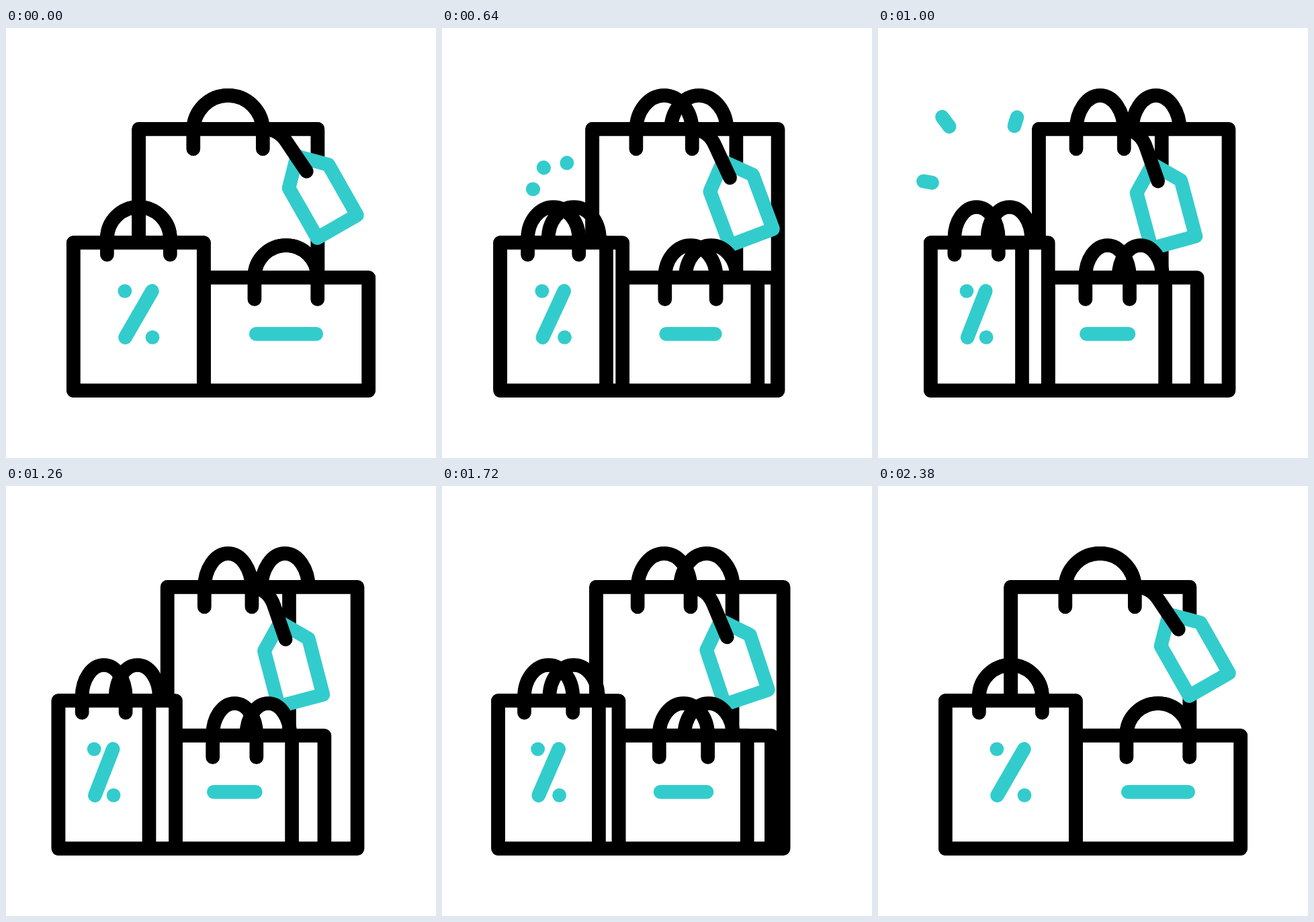
An HTML page with a canvas that plays this animation: 640 px wide and 640 px high, repeating every 2.4 s.

```html
<!DOCTYPE html>
<html lang="en">
<head>
<meta charset="utf-8">
<title>Shopping bags</title>
<style>
  html, body { margin: 0; width: 100%; height: 100%; overflow: hidden; background: #fff; }
  canvas { display: block; width: 640px; height: 640px; }
</style>
</head>
<body>
<canvas id="stage" width="640" height="640"></canvas>
<script>
const ctx = document.getElementById('stage').getContext('2d');
const LOOP = 2400, HALF = LOOP / 2, BASE = 539.6;
const BLACK = '#000', TEAL = '#33cccc';
let turn = 0; // 0 = bags seen from the front, 1 = fully turned

const clamp = x => Math.min(1, Math.max(0, x));
const smooth = x => x * x * (3 - 2 * x);
const at = ([from, delta]) => from + delta * turn;

// Ease along cubic-bezier(x1, 0, x2, 1)
function ease(x, x1, x2) {
  let lo = 0, hi = 1;
  for (let i = 0; i < 24; i++) {
    const t = (lo + hi) / 2, u = 1 - t;
    if (3 * u * u * t * x1 + 3 * u * t * t * x2 + t * t * t < x) lo = t; else hi = t;
  }
  return smooth(lo);
}

function stroke(color, path) {
  ctx.beginPath();
  path();
  ctx.strokeStyle = color;
  ctx.stroke();
}

function line(color, x1, y1, x2, y2) {
  stroke(color, () => { ctx.moveTo(x1, y1); ctx.lineTo(x2, y2); });
}

function dot(x, y) {
  ctx.beginPath();
  ctx.arc(x, y, 10.4, 0, 7);
  ctx.fillStyle = TEAL;
  ctx.fill();
}

function panel(left, right, top) {
  ctx.fillStyle = '#fff';
  ctx.fillRect(left, top, right - left, BASE - top);
  stroke(BLACK, () => ctx.rect(left, top, right - left, BASE - top));
}

function handle([left, right], { spring, rise }, foot) {
  const l = at(left), r = at(right);
  stroke(BLACK, () => {
    ctx.moveTo(l, foot);
    ctx.lineTo(l, spring);
    ctx.ellipse((l + r) / 2, spring, (r - l) / 2, rise, 0, Math.PI, 2 * Math.PI);
    ctx.lineTo(r, foot);
  });
}

function bag(b) {
  const left = at(b.left);
  handle(b.backHandle, b, b.top);
  panel(left, at(b.side), b.top);
  panel(left, at(b.front), b.top);
  handle(b.frontHandle, b, b.foot);
}

// Horizontal positions are [start, shift at full turn]
const tall = {
  top: 150.4, spring: 152.2, rise: 51.8, foot: 180,
  left: [197.7, 42.6], front: [463.8, -42.4], side: [463.8, 59.3],
  frontHandle: [[278.8, 16.5], [382.3, -16.4]],
  backHandle: [[278.8, 101.2], [382.3, 68.3]]
};
const wide = {
  top: 371.5, spring: 370.5, rise: 47, foot: 403.7,
  left: [294.3, -41.9], front: [539.6, -114.2], side: [539.6, -65.8],
  frontHandle: [[369.9, -62.3], [463.7, -91]],
  backHandle: [[369.9, -12.1], [463.7, -41]]
};
const small = {
  top: 319.5, spring: 313.5, rise: 47, foot: 337.5,
  left: [100.4, -22.4], front: [294.3, -81.4], side: [294.3, -41.9],
  frontHandle: [[150.4, -37.3], [244.3, -66.3]],
  backHandle: [[150.4, 12.8], [244.3, -16.2]]
};
const tagShape = new Path2D('M433 191L480 203.6L522.5 278.5L463.3 312.5L421 238.3Z');
const tagString = new Path2D('M382 150.4C398 150.4 409 156 418 170L447.3 213.4');
const sparks = [
  [135.8, 239.9, 67.5, 228],
  [151.6, 208.2, 95.5, 132.3],
  [185.8, 201.2, 207, 132.8]
];

function drawTag() {
  ctx.save();
  ctx.translate(383.5 - 16.4 * turn, 164.5);
  ctx.rotate(turn * Math.PI / 12);
  ctx.translate(-383.5, -164.5);
  ctx.fillStyle = '#fff';
  ctx.fill(tagShape);
  ctx.strokeStyle = TEAL;
  ctx.stroke(tagShape);
  ctx.strokeStyle = BLACK;
  ctx.stroke(tagString);
  ctx.restore();
}

function drawSparks(time) {
  if (time < 625 || time > 1110) return;
  const head = smooth(clamp((time - 620) / 380));
  const tail = smooth(clamp((time - 720) / 390));
  for (const [x, y, endX, endY] of sparks) {
    const dx = endX - x, dy = endY - y;
    line(TEAL, x + dx * tail, y + dy * tail, x + dx * head, y + dy * head);
  }
}

function draw(time) {
  turn = time < HALF
    ? ease(time / HALF, 0.8, 0.225)
    : 1 - ease(time / HALF - 1, 0.8, 0.2);
  ctx.fillStyle = '#fff';
  ctx.fillRect(0, 0, 640, 640);
  ctx.lineWidth = 20.7;
  ctx.lineCap = ctx.lineJoin = 'round';

  bag(tall);
  drawTag();
  bag(wide);
  line(TEAL, at([372.2, -63]), 455.4, at([461.7, -90.5]), 455.4);
  bag(small);
  dot(at([176.9, -45.8]), 391.6);
  dot(at([218, -58]), 460.3);
  line(TEAL, at([217.4, -58.3]), 391.5, at([177.5, -45.2]), 460.5);
  drawSparks(time);
}

const start = performance.now();
function tick() {
  draw((performance.now() - start) % LOOP);
  requestAnimationFrame(tick);
}
tick();
</script>
</body>
</html>
```
